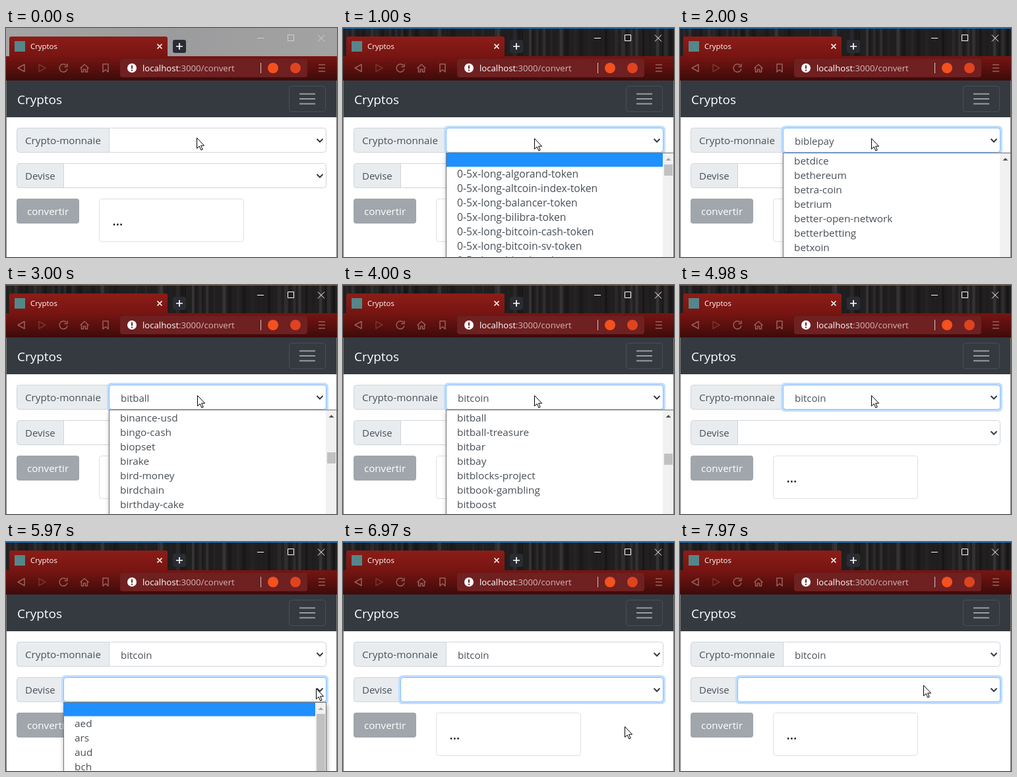
Write an HTML page that moves like this. It is 502 px wide and 349 px high and loops after 8000 ms.

```html
<!DOCTYPE html>
<html lang="fr">
<head>
<meta charset="utf-8">
<title>Cryptos</title>
<style>
html, body { margin: 0; width: 100%; height: 100%; overflow: hidden; background: #fff; }
svg { display: block; width: 502px; height: 349px; font-family: "Open Sans", "Noto Sans", sans-serif; }
text { white-space: pre; }
</style>
</head>
<body>
<svg viewBox="0 0 502 349">
  <defs>
    <linearGradient id="tab" x2="0" y2="1"><stop stop-color="#8c1d18"/><stop offset="1" stop-color="#771512"/></linearGradient>
    <linearGradient id="bar" x2="0" y2="1"><stop stop-color="#771512"/><stop offset="1" stop-color="#3d0b0a"/></linearGradient>
    <linearGradient id="idle"><stop stop-color="#a5a5a5"/><stop offset=".5" stop-color="#9b9b9d"/><stop offset="1" stop-color="#a3a3a3"/></linearGradient>
    <filter id="shade" x="-10%" y="-10%" width="120%" height="120%"><feDropShadow dx="1" dy="3" stdDeviation="3" flood-opacity=".4"/></filter>
  </defs>
  <g id="title"></g>

  <!-- browser tab and toolbar -->
  <path d="M5 43V16q0-3 3-3H242q3 0 3 3V43z" fill="url(#tab)"/>
  <rect y="43" width="502" height="37" fill="url(#bar)"/>
  <rect x="13" y="20" width="16" height="16" fill="#55868a"/>
  <text x="37" y="32" font-size="11.4" fill="#fff">Cryptos</text>
  <path d="M229.500 24.500l7 7m0-7l-7 7" stroke="#fff" stroke-width="1.600"/>
  <rect x="253" y="18" width="20" height="20" rx="3" fill="#2a2c34"/>
  <path d="M258 28h10m-5-5v10" stroke="#fff" stroke-width="1.700"/>
  <g fill="none" stroke="#98605f" stroke-width="1.500" stroke-linejoin="round">
    <path d="M28 55.500v11l-10-5.500z"/>
    <path d="M50 55.500v11l10-5.500z" opacity=".45"/>
    <path d="M91.500 57a6 6 0 1 0 1.500 5M93 54.500v4.500h-4.500"/>
    <path d="M112.500 61.500l6.500-6 6.500 6M114.500 60.500v6.500h3v-4h3v4h3v-6.500"/>
    <path d="M147 55h8v12l-4-3.500-4 3.500z"/>
    <path d="M474 56h10m-10 5h10m-10 5h10"/>
  </g>
  <rect x="173" y="47" width="284" height="28" rx="4" fill="#6f2021"/>
  <circle cx="191" cy="61" r="7" fill="#fff"/>
  <path d="M191 57v5m0 1.500v2" stroke="#6f2021" stroke-width="2"/>
  <text x="207" y="66" font-size="13.150" fill="#fff">localhost<tspan fill="#d3b5b5">:3000/convert</tspan></text>
  <path d="M386.500 53v16" stroke="#d8c4c4"/>
  <circle cx="405" cy="61" r="8" fill="#f4511e"/>
  <circle cx="439" cy="61" r="8" fill="#e0431f"/>

  <!-- page -->
  <rect y="80" width="502" height="56" fill="#343a40"/>
  <text x="17" y="116" font-size="18.950" fill="#fff">Cryptos</text>
  <rect x="429.500" y="88.500" width="55" height="39" rx="4" fill="none" stroke="#4a4f55"/>
  <path d="M445 100.500h24m-24 7.500h24m-24 7.500h24" stroke="#9a9da0" stroke-width="1.800"/>
  <rect x="16" y="260" width="95" height="38" rx="4" fill="#a0a6ab"/>
  <text x="32" y="285" font-size="15.100" fill="#fff">convertir</text>
  <rect x="141.500" y="260.500" width="219" height="65" rx="4" fill="#fff" stroke="#dfdfdf"/>
  <text x="161.500" y="301" font-size="19" font-weight="600" fill="#212529">...</text>
  <g id="form"></g>
  <path d="M.5 80V349M501.500 80V349" stroke="#777"/>
  <g id="menu"></g>
  <path id="cursor" d="M.5 .5v16l3.700-3.500 2.600 6 2.400-1-2.600-5.800h5z" fill="#fff" stroke="#000"/>
</svg>
<script>
const $ = id => document.getElementById(id);
const INK = "#495057";

const rect = (x, y, w, h, fill, more = "") =>
  `<rect x="${x}" y="${y}" width="${w}" height="${h}" fill="${fill}" ${more}/>`;
const text = (x, y, size, s) =>
  `<text x="${x}" y="${y}" font-size="${size}" fill="${INK}">${s}</text>`;

function titleBar(active) {
  let out = rect(0, 0, 502, 43, active ? "#211f20" : "url(#idle)");
  if (active) {
    let seed = 7;
    const rnd = () => (seed = seed * 16807 % 2147483647) / 2147483647;
    for (let x = 0; x < 502; x += 2 + rnd() * 9) {
      out += rect(x, 1, 1 + rnd() * 5, 42, rnd() < .5 ? "#000" : "#6b6666", `opacity="${rnd() * .3}"`);
    }
    out += rect(0, 0, 502, 1, "#1675c0");
  }
  return out + `<path d="M381 15.500h10M427.500 10.500h9v9h-9zM473 10.500l10 10m0-10l-10 10"
    fill="none" stroke="${active ? "#fff" : "#d0d0d0"}"/>`;
}

function field(y, split, label, size, value, focus) {
  const w = 485.5 - split;
  const box = `rx="4" stroke="${focus ? "#80bdff" : "#ced4da"}"`;
  return rect(16.5, y + .5, split - 12, 37, "#e9ecef", 'rx="4" stroke="#ced4da"')
    + text(29, y + 25, size, label)
    + (focus ? rect(split - 3.5, y - 3, w + 7, 44, "#bfdeff", 'rx="6"') : "")
    + rect(split, y + .5, w, 37, "#fff", box)
    + (focus ? "" : rect(split, y + 1, 5, 36, "#fff")
      + rect(split - .5, y, 1, 38, "#ced4da"))
    + text(174, y + 26, 15, value)
    + `<path d="M471.500 ${y + 17}l4.500 4.500 4.500-4.500" fill="none" stroke="#343a40" stroke-width="2"/>`;
}

function dropDown({ x, y, right, rows, size = 15.35, top, thumb, thumbH = 17 }) {
  const bar = right - 17;
  const first = y + (top ? 38 : 18);
  return rect(x + .5, y + .5, right - x - 1, 380, "#fff", 'stroke="#777" filter="url(#shade)"')
    + (top ? rect(x + 1, y + 1, bar - x - 1, 20.5, "#1e90ff") : "")
    + rect(bar, y + 1, 16, 360, "#f1f1f1")
    + `<path d="M${bar + 4.500} ${y + 12}h8l-4-4z" fill="${top ? "#a3a3a3" : "#505050"}"/>`
    + (thumb ? rect(bar + 2, thumb, 13, thumbH, "#c1c1c1") : "")
    + rows.split(" ").map((s, i) => text(x + 17, first + i * 22, size, s)).join("");
}

const coins = { x: 156, y: 190, right: 502 };
const long = ["algorand", "altcoin-index", "balancer", "bilibra", "bitcoin-cash", "bitcoin-sv", "bitcoin"]
  .map(s => `0-5x-long-${s}-token`).join(" ");

const steps = [
  { at: 0, pos: [289, 167], idle: true },
  { at: 1000, pos: [290, 168], focus: 1, list: { ...coins, rows: long, size: 15.7, top: true, thumb: 208 } },
  { at: 2000, pos: [290, 168], focus: 1, coin: "biblepay", list: { ...coins,
    rows: "betdice bethereum betra-coin betrium better-open-network betterbetting betxoin" } },
  { at: 3000, pos: [290, 168], focus: 1, coin: "bitball", list: { ...coins, thumb: 255,
    rows: "binance-usd bingo-cash biopset birake bird-money birdchain birthday-cake" } },
  { at: 4000, pos: [290, 168], focus: 1, coin: "bitcoin", list: { ...coins, thumb: 257,
    rows: "bitball bitball-treasure bitbar bitbay bitblocks-project bitbook-gambling bitboost" } },
  { at: 4980, pos: [290, 168], focus: 1, coin: "bitcoin" },
  { at: 5970, pos: [470, 223], focus: 2, coin: "bitcoin", list: { x: 87, y: 244, right: 486,
    rows: "aed ars aud bch", top: true, thumb: 262, thumbH: 90 } },
  { at: 6970, pos: [427, 281], focus: 2, coin: "bitcoin" },
  { at: 7970, pos: [369, 218], focus: 2, coin: "bitcoin" }
];

let shown;
function draw(now) {
  const t = now % 8000;
  const step = steps.findLast(s => s.at <= t);
  if (step !== shown) {
    shown = step;
    $("title").innerHTML = titleBar(!step.idle);
    $("form").innerHTML = field(152, 156.5, "Crypto-monnaie", 15.2, step.coin || "", step.focus === 1)
      + field(206, 87.5, "Devise", 14.95, "", step.focus === 2);
    $("menu").innerHTML = step.list ? dropDown(step.list) : "";
    $("cursor").setAttribute("transform", `translate(${step.pos})`);
  }
  requestAnimationFrame(draw);
}
draw(0);
</script>
</body>
</html>
```
